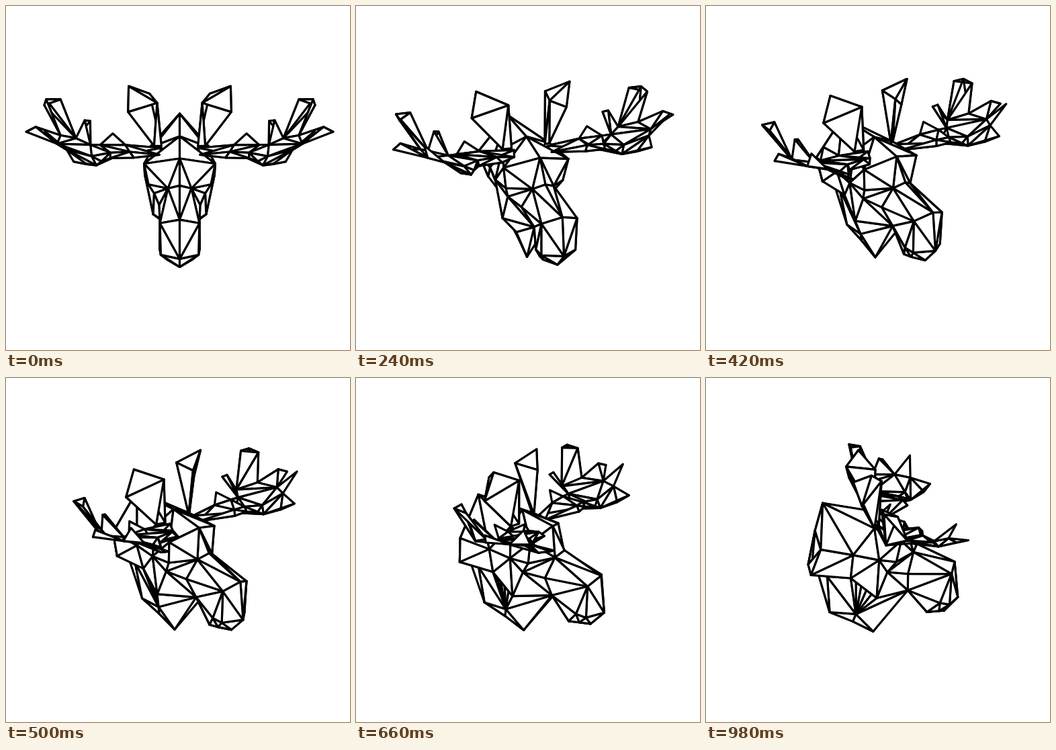
An HTML page with a canvas for the animation above (1 s loop, 512 by 512 pixels).

```html
<!DOCTYPE html>
<html lang="en">
<head>
<meta charset="utf-8">
<title>Turning moose head</title>
<style>
  html, body { margin: 0; width: 100%; height: 100%; overflow: hidden; background: #fff; }
  canvas { display: block; width: 100vw; height: 100vh; }
</style>
</head>
<body>
<canvas width="512" height="512"></canvas>
<script>
// Half model: x outwards from the middle, y down, z towards the nose.
const head = {
  pts: {
    A: [0, -76, -84], S: [0, -61, -12], T: [0, -42, 37], W: [0, -7, 56],
    X: [0, 24, 114], Z: [0, 81, 120], N: [0, 102, 99],
    L: [0, 130, -10], O: [0, 112, -41], M: [0, 95, -76],
    U: [52, -30, 24], V: [17, 0, 48], Y: [28, 33, 104], I: [29, 78, 87],
    i: [27, 82, 102], E: [18, 95, 88], J: [15, 97, 70], H: [11, 62, 41],
    c: [38, 22, 6], k: [30, 29, 38], e: [46, 4, 18],
    F: [52, -2, -8], G: [40, 61, -10], C: [45, -9, -45], D: [29, 32, -47],
    K: [46, -20, -92], B: [24, 26, -105], R: [38, -46, -13],
    n: [6, 98, -37], P: [11, 30, -93], Q: [11, 34, -80]
  },
  faces: `ASR ARC ACK KCB BCD CRF CFD DFG STU SUR RUF TWV TVU
    UVe Vce cFe FUe FcG cVk ckH cHG WXV VXY VYk kYH HYI HIJ
    XZY YZi YiI IiE iZN iNE IEJ AKK~ KBK~ BB~K~ HJH~ JJ~H~ EE~N EE~J
    MPQ MQn QDn nGH nHL nLO nOM`
};

const ear = {
  pts: {
    t: [75, -135, -22], a: [77, -92, -36], b: [33, -115, -2],
    c: [45, -118, -44], d: [38, -46, -13], e: [27, -48, -5]
  },
  faces: 'tab tbc adb deb cbe cat acd ced'
};

const antler = {
  pts: {
    A: [176, -115, -22], B: [198, -111, -4], C: [197, -115, -22],
    D: [154, -58, -13], E: [174, -70, 13],
    F: [133, -81, -25], G: [141, -83, -22], H: [131, -54, 8],
    I: [99, -66, -10], J: [117, -53, 5], K: [80, -52, 2],
    L: [66, -48, 52], l: [72, -55, 46],
    M: [27, -48, 4], N: [30, -40, 12],
    O: [100, -46, 48], o: [100, -53, 44], m: [112, -45, 60], Q: [95, -42, 30],
    R: [119, -41, 66], r: [126, -52, 58], S: [176, -68, 49], T: [160, -66, 72],
    U: [208, -87, 28], V: [221, -82, 36], W: [190, -95, 76],
    X: [148, -58, 102], Y: [131, -50, 89]
  },
  faces: `MKN NKl NlL MKQ NLQ MNQ KIJ KJl Jlo JHo Hor HrS HDS DES
    lLO lOo oOm omr mRr rRT rST QLO QOm QmR QRH JHQ QJK
    HFG HGD HFD ACB ABD DBE ACD CBE CED
    EUS UVS EUV SWT RTY TYX RYX`
};

const rad = Math.PI / 180;
const tiltSin = .315, tiltCos = .949, eye = 1850;
const ctx = document.querySelector('canvas').getContext('2d');

const mix = (a, b, u) => a.map((v, i) => v + (b[i] - v) * u);
const flip = ([x, y, z], side) => [x * side, y, z];

// A tilde takes the point from the opposite half.
function build({ pts, faces }) {
  return [-1, 1].flatMap(side => faces.trim().split(/\s+/).map(face =>
    face.match(/\w~?/g).map(v => flip(pts[v[0]], v[1] ? -side : side))));
}

// Narrow fan of triangles on the throat.
function throat({ D, G, n }) {
  const tris = [];
  for (const side of [-1, 1])
    for (let i = 0; i < 5; i++)
      tris.push([n, mix(D, G, i / 5), mix(D, G, (i + 1) / 5)].map(p => flip(p, side)));
  return tris;
}

const mesh = [head, ear, antler].flatMap(build).concat(throat(head.pts));

function project([x, y, z], s, c) {
  const turned = z * c - x * s;
  const depth = turned * tiltCos - y * tiltSin;
  const zoom = eye / (eye - depth);
  return [
    258.5 + zoom * (x * c + z * s),
    256 + zoom * (y * tiltCos + turned * tiltSin),
    depth
  ];
}

function draw(angle) {
  const s = Math.sin(angle), c = Math.cos(angle);
  const tris = mesh.map(tri => {
    const p = tri.map(v => project(v, s, c));
    return { p, depth: p[0][2] + p[1][2] + p[2][2] };
  }).sort((a, b) => a.depth - b.depth);

  ctx.fillStyle = '#fff';
  ctx.fillRect(0, 0, 512, 512);
  ctx.strokeStyle = '#000';
  ctx.lineWidth = 3.2;
  ctx.lineJoin = 'round';
  for (const { p } of tris) {
    ctx.beginPath();
    p.forEach(([x, y]) => ctx.lineTo(x, y));
    ctx.closePath();
    ctx.fill();
    ctx.stroke();
  }
}

function tick() {
  const step = Math.floor(performance.now() % 1000 / 20);
  draw(step * 2 * rad);
  requestAnimationFrame(tick);
}
tick();
</script>
</body>
</html>
```
